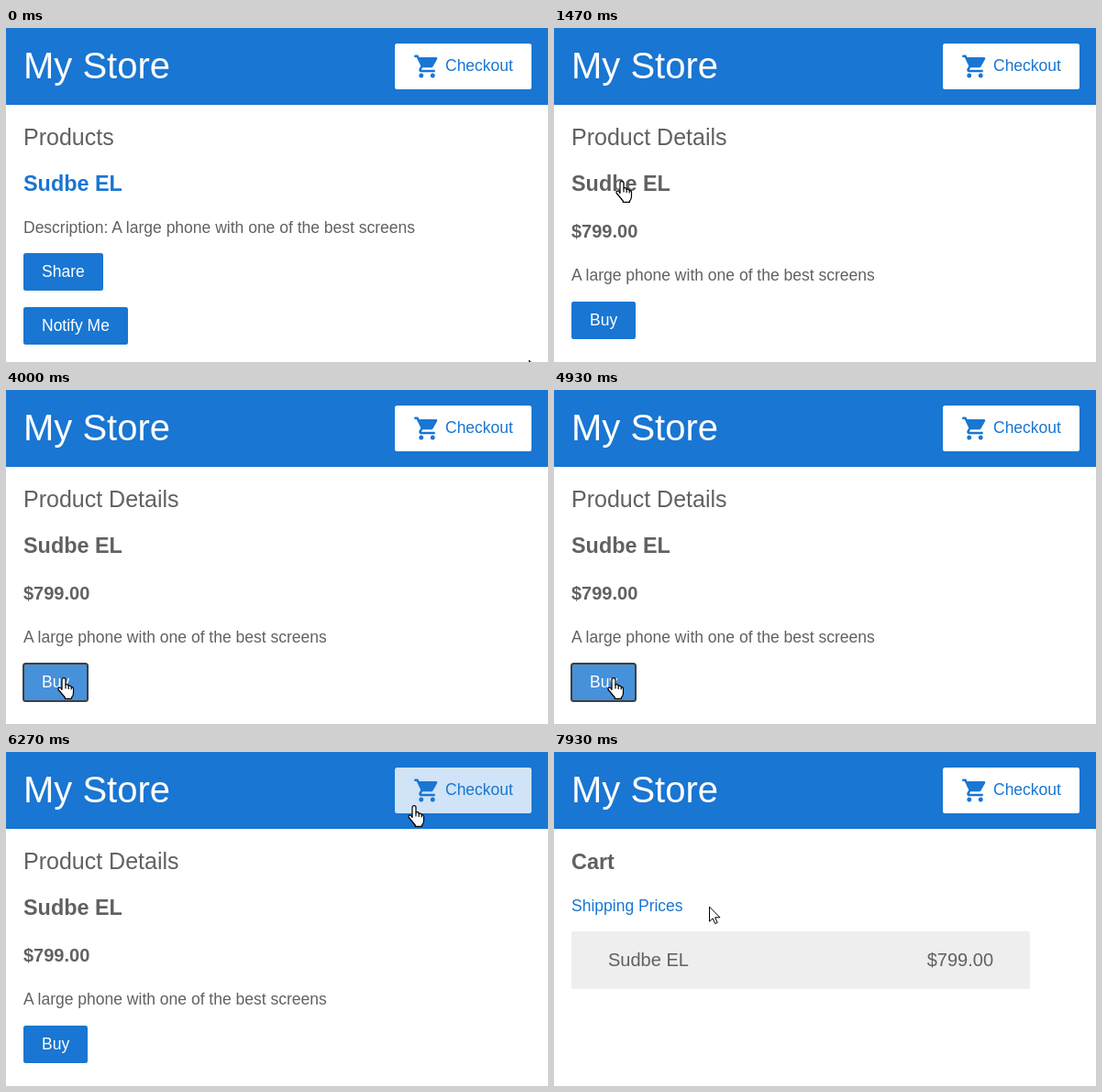
Recreate the animation shown at these times as an HTML page. Size 591 by 365 pixels, loop 8 s.

```html
<!DOCTYPE html>
<html lang="en">
<head>
<meta charset="utf-8">
<title>My Store</title>
<style>
  html, body { margin: 0; width: 100%; height: 100%; overflow: hidden; background: #fff; }
  svg { display: block; width: 100%; height: 100%; }
  text { font: 17.5px "Liberation Sans", Arial, sans-serif; fill: #616161; }
  .h1 { font-size: 40px; fill: #fff; }
  .h2 { font-size: 25px; }
  .h3 { font-size: 23.4px; font-weight: bold; }
  .h4 { font-size: 20px; font-weight: bold; }
  .item { font-size: 20px; }
  .end { text-anchor: end; }
  .blue, .link { fill: #1976d2; }
  .on { fill: #fff; }
  .hover { opacity: .8; }
  .pointer { fill: #fff; stroke: #000; stroke-linejoin: round; stroke-linecap: round; }
  [hidden] { display: none; }
</style>
</head>
<body>
<svg viewBox="0 0 591 365">
  <rect class="blue" width="591" height="84"/>
  <text class="h1" x="19" y="55">My Store</text>
  <g id="checkout">
    <rect class="on" x="424" y="17" width="149" height="50" rx="2.5"/>
    <path class="blue" transform="translate(444 27) scale(1.25)" d="M1 2v2h2l3.6 7.6-1.35 2.4C4.5 15.4 5.5 17 7 17h12v-2H7.4c-.2 0-.3-.2-.2-.4L8.1 13h7.45c.75 0 1.4-.4 1.75-1l3.6-6.5C21.3 4.8 20.8 4 20 4H5.2l-.93-2zM7 18a2 2 0 1 0 .01 0zM17 18a2 2 0 1 0 .01 0z"/>
    <text class="link" x="479" y="47">Checkout</text>
  </g>

  <g id="products">
    <text class="h2" x="19" y="128">Products</text>
    <text class="h3 link" id="link" x="19" y="178">Sudbe EL</text>
    <text x="19" y="224">Description: A large phone with one of the best screens</text>
    <rect class="blue" x="19" y="246" width="87" height="41" rx="2.5"/>
    <text class="on" x="39" y="272">Share</text>
    <rect class="blue" x="19" y="305" width="114" height="41" rx="2.5"/>
    <text class="on" x="39" y="331">Notify Me</text>
  </g>

  <g id="details">
    <text class="h2" x="19" y="128">Product Details</text>
    <text class="h3" x="19" y="178">Sudbe EL</text>
    <text class="h4" x="19" y="229">$799.00</text>
    <text x="19" y="276">A large phone with one of the best screens</text>
    <g id="buy">
      <rect class="blue" x="19" y="299" width="70" height="41" rx="2.5"/>
      <text class="on" x="39" y="325">Buy</text>
      <rect id="ring" x="19" y="299" width="70" height="41" rx="2.5" fill="none" stroke="#101010" stroke-width="2"/>
    </g>
    <g id="tooltip" opacity=".5">
      <rect x="85.5" y="184.5" width="130" height="31" fill="#fff" stroke="#767676"/>
      <text x="95" y="205" style="font-size:15px">Sudbe EL details</text>
    </g>
  </g>

  <g id="cart">
    <text class="h3" x="19" y="128">Cart</text>
    <text class="link" x="19" y="174">Shipping Prices</text>
    <rect x="19" y="196" width="500" height="63" rx="2.5" fill="#eee"/>
    <text class="item" x="59" y="234">Sudbe EL</text>
    <text class="item end" x="479" y="234">$799.00</text>
  </g>

  <g id="cursor" class="pointer">
    <path id="arrow" d="M.5.5V16.2l3.6-3.4 2.6 5.8 2.5-1.1-2.6-5.7h5z"/>
    <g id="hand" transform="translate(-7 0)" stroke-width="1.2">
      <path d="M5 13.5V2.6a2 2 0 0 1 4 0V8q3-1 3.2 1.4 2.6-.8 3 1.2 2.3-.3 2.3 2V17q0 3-2 5v1.4H8.3V22Q4.500 17.500 1.200 13.500.300 11 2.500 11 4 11.500 5 13.500z"/>
      <path d="M9 8v4M12.200 9.400V12.500M15.200 10.600V13"/>
    </g>
    <path id="beam" fill="none" d="M-3-7.500H-1L0-6.500 1-7.500H3M0-6.500V7.500M-3 8.500H-1L0 7.500 1 8.500H3"/>
  </g>
</svg>
<script>
  const LOOP = 8000, FPS = 15;
  const $ = id => document.getElementById(id);
  const show = (id, on) => $(id).toggleAttribute('hidden', !on);

  const smooth = k => k * k * (3 - 2 * k);
  const speedUp = k => k ** 1.5;
  const slowDown = k => 1 - (1 - k) ** 1.6;
  const steady = k => k;

  // Pointer stops: step, x, y, easing used to get there
  const stops = [
    [6, 570, 363],
    [17, 74, 167, smooth],
    [28, 74, 167, steady],
    [38, 65, 304, smooth],
    [40, 62, 314, steady],
    [59, 62, 314, steady],
    [61, 64.5, 314, steady],
    [73, 64.5, 314, steady],
    [74, 65, 314, steady],
    [86, 329, 103, speedUp],
    [92, 445, 58, slowDown],
    [111, 445, 58, steady],
    [112, 421, 69, steady],
    [119, 169, 169, smooth]
  ];

  function pointerAt(step) {
    const i = stops.findIndex(s => s[0] >= step);
    if (i <= 0) return stops[i ? stops.length - 1 : 0].slice(1, 3);
    const [n0, x0, y0] = stops[i - 1], [n1, x1, y1, ease] = stops[i];
    const k = ease((step - n0) / (n1 - n0));
    return [x0 + (x1 - x0) * k, y0 + (y1 - y0) * k];
  }

  // Hit areas: left, top, right, bottom
  const areas = {
    checkout: [424, 17, 573, 67],
    link: [19, 157, 126, 184],
    buy: [19, 299, 89, 340]
  };
  const detailText = [areas.link, [19, 211, 91, 235], [19, 259, 350, 281]];
  const inside = ([x, y], [l, t, r, b]) => x >= l && x < r && y >= t && y < b;

  function render(time) {
    const step = Math.floor(time * FPS / 1000 + .06);
    const page = step < 22 ? 'products' : step < 96 ? 'details' : 'cart';
    for (const id of ['products', 'details', 'cart']) show(id, id === page);
    show('tooltip', step === 25);
    show('ring', step >= 43 && step < 94);

    const pos = pointerAt(step), before = pointerAt(step - 1);
    const active = { checkout: true, link: page === 'products', buy: page === 'details' };
    let cursor = page === 'details' && detailText.some(a => inside(pos, a)) ? 'beam' : 'arrow';
    for (const id in areas) {
      const over = active[id] && inside(pos, areas[id]);
      // Hover styling clears one step after the pointer leaves
      $(id).classList.toggle('hover', over || active[id] && inside(before, areas[id]));
      if (over) cursor = 'hand';
    }
    if (step >= 22 && step < 29) cursor = 'hand';

    for (const id of ['arrow', 'hand', 'beam']) show(id, id === cursor);
    $('cursor').setAttribute('transform', `translate(${pos.map(Math.round)})`);
  }

  function tick() {
    render(performance.now() % LOOP);
    requestAnimationFrame(tick);
  }
  tick();
</script>
</body>
</html>
```
